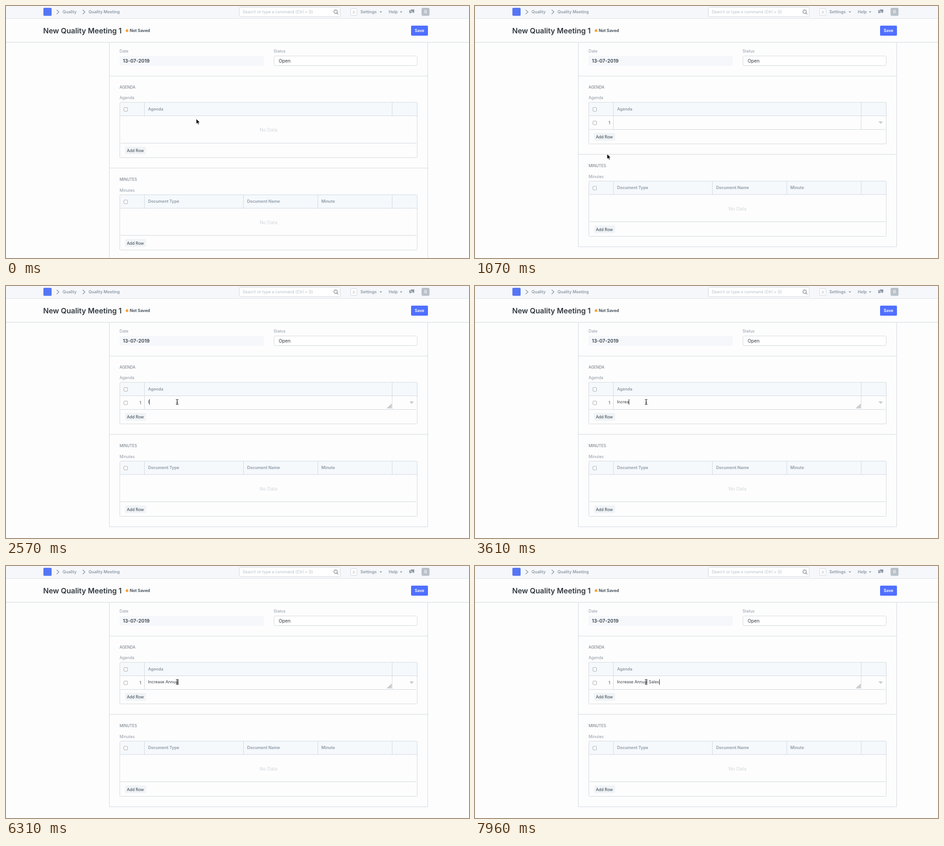
These frames come from a looping animation (1015x552 px, 8000 ms). An HTML page:

```html
<!DOCTYPE html>
<html lang="en">
<head>
<meta charset="utf-8">
<title>New Quality Meeting</title>
<style>
  html, body { margin: 0; width: 100%; height: 100%; overflow: hidden; background: #fdfdfd; }
  svg { display: block; }
  text { font: 400 8.85px Inter, "Open Sans", sans-serif; fill: #36414c; white-space: pre; }
  .bold { font-weight: 600; font-size: 8.95px; }
  .muted { fill: #8d99a6; }
  .section { font-size: 8.35px; fill: #6c7680; }
  .big { font-size: 10.3px; }
  .mid { text-anchor: middle; }
  .pale { fill: #d1d8dd; }
  .line { fill: none; stroke: #d1d8dd; }
  .input { fill: #fff; stroke: #d1d8dd; }
  .head { fill: #f5f9fc; }
  .check { fill: #fff; stroke: #9b9ea1; stroke-width: .9; }
  .btn { fill: #f0f4f7; }
  .btn.hover { fill: #cdd9e1; }
  .icon { fill: none; stroke: #8d99a6; stroke-width: 1.5; }
</style>
</head>
<body>
<svg width="1015" height="552" viewBox="0 0 1015 552">
  <defs>
    <rect id="check" class="check" x=".5" y=".5" width="8" height="8" rx="1.8"/>
    <path id="chevron" class="icon" d="M.5 .5L5.5 5.3L.5 10.1"/>
    <path id="drop" fill="#8d99a6" d="M0 0H5.4L2.7 2.9Z"/>
  </defs>

  <!-- navbar -->
  <rect width="1015" height="27" fill="#f5f7fa"/>
  <path class="line" d="M0 27.5H1015" opacity=".65"/>
  <rect x="82" y="4" width="18" height="17.5" rx="2" fill="#5575f5"/>
  <use href="#chevron" x="110.5" y="7.7"/>
  <text class="bold muted" x="124" y="16.3">Quality</text>
  <use href="#chevron" x="167.5" y="7.7"/>
  <text class="bold muted" x="181" y="16.3">Quality Meeting</text>
  <rect class="input" x="511.5" y="2.5" width="221" height="21" rx="3"/>
  <text x="518.8" y="16.3" fill="#b8c2cc" style="fill:#b8bfc7">Search or type a command (Ctrl + G)</text>
  <g class="icon" style="stroke:#6c7680;stroke-width:1.2">
    <circle cx="722.6" cy="12.4" r="3.7"/>
    <path d="M725.3 15.2L728.4 18.4"/>
  </g>
  <rect class="input" x="755.5" y="5.5" width="14" height="15" rx="2.5"/>
  <text class="mid" x="762.5" y="16.6" style="fill:#b8c2cc">A</text>
  <text class="bold muted" x="777" y="16.3">Settings</text>
  <use href="#drop" x="819" y="11.8"/>
  <text class="bold muted" x="839" y="16.3">Help</text>
  <use href="#drop" x="863.5" y="11.8"/>
  <path fill="#8d99a6" d="M887.5 7.5H895V14H893.8V16L891.8 14H891V11.8H887.5Z"/>
  <path fill="#8d99a6" d="M884 9H886.7V12.7H890.2V14.8H887.6L885.4 17V14.8H884Z"/>
  <rect x="911" y="4" width="17.5" height="17.5" rx="3" fill="#b9c1c9"/>
  <text class="bold mid" x="919.8" y="16.1" style="fill:#fff">0</text>

  <!-- page head -->
  <text x="81.5" y="60" style="font-size:16px;font-weight:600;fill:#30383f">New Quality Meeting 1</text>
  <circle cx="265.3" cy="54" r="2.9" fill="#ffa030"/>
  <text class="bold" x="271.2" y="57.1">Not Saved</text>
  <rect x="888" y="43" width="37" height="22" rx="2" fill="#5070ff"/>
  <text class="bold mid" x="906.5" y="57.2" style="fill:#fff">Save</text>
  <path class="line" d="M0 79.5H1015"/>

  <!-- first section -->
  <text class="muted" x="249" y="102">Date</text>
  <rect x="249" y="109" width="316" height="22" rx="3" fill="#f5f7fa"/>
  <text class="bold" x="256.3" y="123.5" style="font-size:10.6px">13-07-2019</text>
  <text class="muted" x="586.6" y="102">Status</text>
  <rect class="input" x="587.5" y="109.5" width="314" height="21" rx="3"/>
  <text class="big" x="597.7" y="123.5">Open</text>
  <path class="line" d="M226.5 80V500M924.5 80V500M227 153.5H924"/>

  <!-- agenda table -->
  <text class="section" x="249" y="180.5">AGENDA</text>
  <text class="muted" x="249" y="204">Agenda</text>
  <rect class="head" x="250" y="211" width="651" height="29"/>
  <path class="line" d="M249.5 245V213Q249.5 211 251.5 211H899.5Q901.5 211 901.5 213V245M250 240.5H901M303.5 211V240M846.5 211V240"/>
  <use href="#check" x="258" y="222"/>
  <text class="bold muted" x="311.5" y="229.3">Agenda</text>
  <text id="empty" class="big mid pale" x="575.5" y="275">No Data</text>
  <g id="row">
    <path class="line" d="M303.5 240V270M846.5 240V270"/>
    <use href="#check" x="258" y="251.5"/>
    <text x="296.3" y="258.8" text-anchor="end">1</text>
    <path fill="#c3c8cd" d="M884.5 253H894L889.2 258Z"/>
  </g>
  <g id="field">
    <path fill="none" stroke="#666" stroke-width="1" d="M836 268L845.5 259M839.3 268L845.5 262M842.6 268L845.5 265.2"/>
    <text id="entry" xml:space="preserve" x="311.4" y="257.2"></text>
    <rect id="caret" y="248" width="1" height="12" fill="#222"/>
  </g>

  <!-- everything that moves up when the row replaces the empty state -->
  <g id="below">
    <path class="line" d="M249.5 243V330Q249.5 332 251.5 332H899.5Q901.5 332 901.5 330V243M251 300.5H900M227 355H924M226.5 300V557.5H924.5V300"/>
    <rect id="add" class="btn" x="261" y="308" width="46" height="17" rx="3"/>
    <text class="mid" x="283.6" y="320">Add Row</text>

    <text class="section" x="249" y="383">MINUTES</text>
    <text class="muted" x="249" y="406.5">Minutes</text>
    <rect class="head" x="250" y="414" width="651" height="29"/>
    <rect class="line" x="249.5" y="413.5" width="652" height="121" rx="2"/>
    <path class="line" d="M250 443H901M251 502.5H900M303.5 414V443M520.5 414V443M683.5 414V443M846.5 414V443"/>
    <use href="#check" x="258" y="424.5"/>
    <text class="bold muted" x="311.5" y="431.2">Document Type</text>
    <text class="bold muted" x="528.5" y="431.2">Document Name</text>
    <text class="bold muted" x="691.3" y="431.2">Minute</text>
    <text class="big mid pale" x="575.5" y="477.5">No Data</text>
    <rect class="btn" x="261" y="510.5" width="46" height="17" rx="3"/>
    <text class="mid" x="283.6" y="522.5">Add Row</text>
  </g>

  <!-- pointers -->
  <path id="arrow" fill="#000" stroke="#fff" stroke-width=".9" d="M0 0V11.4L2.6 9L4.4 13L6.4 12.1L4.7 8.3H8.2Z"/>
  <path id="beam" fill="none" stroke="#222" stroke-width="1.2" d="M372.5 248.5Q375.2 248.5 375.2 250.2Q375.2 248.5 378 248.5M375.2 250V258M372.5 259.3Q375.2 259.3 375.2 257.6Q375.2 259.3 378 259.3M373.8 254.6H376.7"/>
</svg>
<script>
  const LOOP = 8000, ROW_AT = 1070, FOCUS_AT = 1820;
  const PHRASE = "Increase Annual Sales";

  // time, pointer tip x, y
  const path = [
    [0, 417, 247], [150, 409, 255], [300, 381, 277], [460, 342, 300],
    [610, 305, 317], [770, 292, 323], [920, 289.5, 324],
    [1220, 302, 314], [1370, 346, 277], [1520, 374.5, 253.5]
  ];
  // time, letters typed, caret shown
  const typing = [
    [0, 0, 0], [1970, 0, 1], [2570, 1, 1], [2720, 2, 1], [3170, 4, 1],
    [3460, 5, 1], [3610, 6, 1], [3760, 7, 1], [4060, 8, 1], [4210, 9, 0],
    [4810, 9, 1], [5110, 9, 0], [5260, 10, 1], [5410, 11, 1], [5860, 12, 1],
    [6010, 13, 1], [6310, 14, 1], [6460, 15, 1], [6610, 16, 1], [7060, 17, 0],
    [7360, 18, 1], [7510, 19, 1], [7660, 20, 1], [7960, 21, 1]
  ];

  const el = id => document.getElementById(id);
  const show = (id, on) => el(id).style.display = on ? "" : "none";
  const at = (steps, t) => steps.filter(s => s[0] <= t).pop();

  function draw(t) {
    const [, x, y] = at(path, t);
    const [, count, caretOn] = at(typing, t);
    const hasRow = t >= ROW_AT, focused = t >= FOCUS_AT;
    const hover = !hasRow && x >= 261 && x <= 307 && y >= 308 && y <= 325;

    show("empty", !hasRow);
    show("row", hasRow);
    show("field", focused);
    show("arrow", !focused);
    show("beam", focused);
    show("caret", caretOn);
    el("below").setAttribute("transform", `translate(0 ${hasRow ? -30 : 0})`);
    el("add").classList.toggle("hover", hover);
    el("arrow").setAttribute("transform", `translate(${x} ${y})`);

    const entry = el("entry");
    entry.textContent = PHRASE.slice(0, count).replace(/ /g, "\u00a0");
    const width = count ? entry.getComputedTextLength() : 0;
    el("caret").setAttribute("x", Math.round(311.4 + width));
  }

  const start = performance.now();
  function tick() {
    draw((performance.now() - start) % LOOP);
    requestAnimationFrame(tick);
  }
  tick();
</script>
</body>
</html>
```
